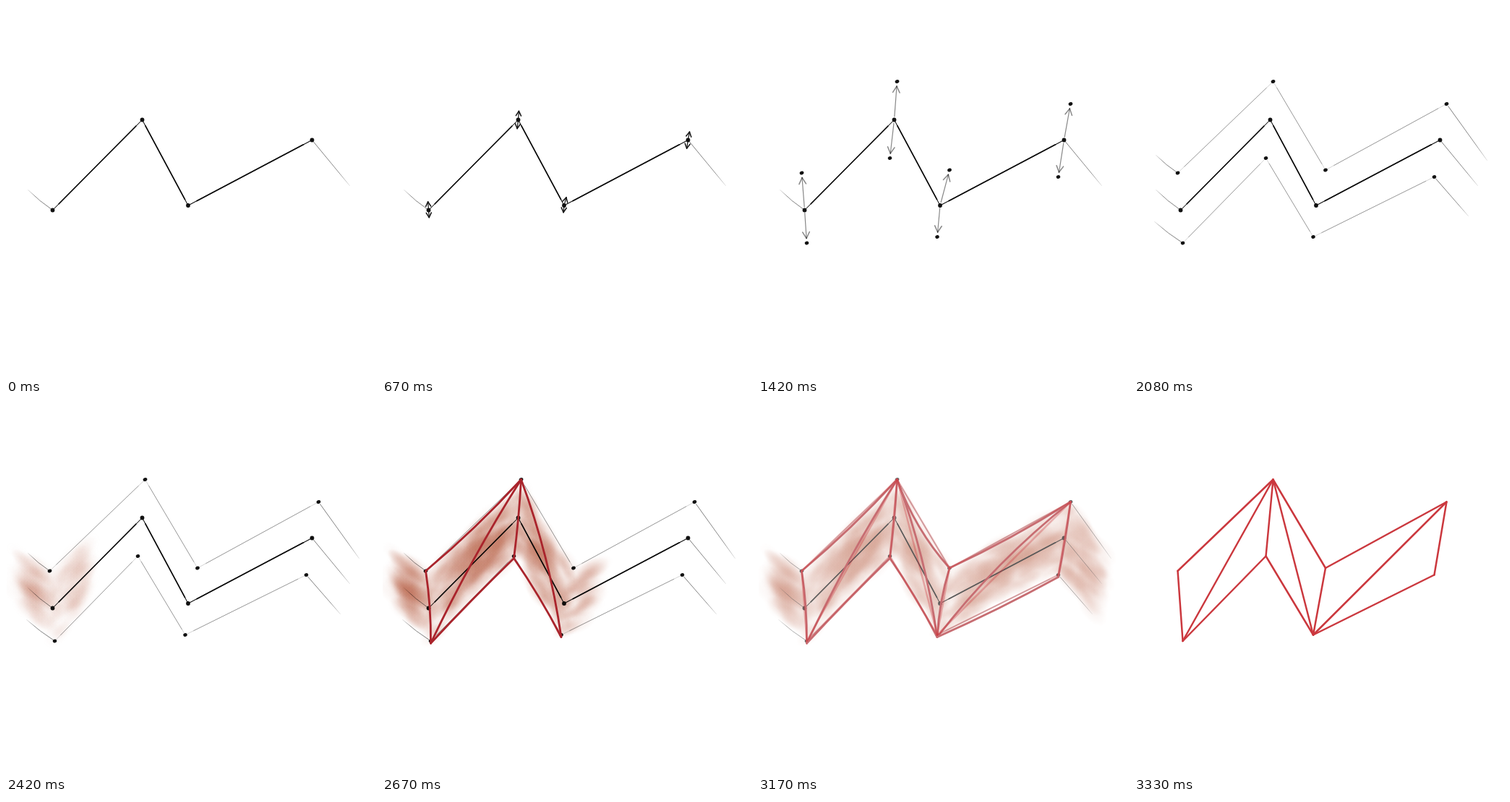
These frames come from a looping animation (512x512 px, 4.08 s). An HTML page with a canvas:

```html
<!DOCTYPE html>
<html lang="en">
<head>
<meta charset="utf-8">
<title>From line to triangles</title>
<style>
html, body { margin: 0; width: 100%; height: 100%; overflow: hidden; background: #fff; }
canvas { display: block; width: 100vw; height: 100vh; object-fit: contain; }
</style>
</head>
<body>
<canvas id="stage" width="512" height="512"></canvas>
<script>
const SIZE = 512, LOOP = 4080, FPS = 12;
// Ticks at which each phase begins
const GROW = 8, FADE = 17, OUTLINE = 25, PAINT = 29, CLEAN = 38;
const PAINT_STEPS = 6, TAU = Math.PI * 2;

const ctx = document.getElementById('stage').getContext('2d');

// Three parallel rails; the first and last points are loose tails
const top_ = [[30, 206], [60, 230.5], [192, 104], [264.5, 226.5], [432, 135], [488, 213]];
const mid = [[30, 254], [64, 282], [188, 157], [251.5, 275.5], [423, 185], [475, 248]];
const low = [[28, 298], [67, 327.5], [182, 210], [247.5, 319], [415, 236], [462, 290]];
const joints = [1, 2, 3, 4];

const corners = {
  a: top_[1], c: top_[2], e: top_[3], g: top_[4],
  b: low[1], d: low[2], f: low[3], h: low[4]
};
// New edges of each triangle, with the sideways bow of the loose stroke
const triangles = [
  { ab: 2, ac: -3, bc: 4 }, { bd: 1, cd: 1 }, { df: 2, cf: 6 },
  { ce: -7, ef: -3 }, { eg: -3, fg: 8 }, { gh: 1, hf: 2 }
];

function makeRandom(seed) {
  return () => (seed = (seed * 16807) % 2147483647) / 2147483647;
}

const clamp = x => Math.max(0, Math.min(1, x));
const mix = (p, q, k) => [p[0] + (q[0] - p[0]) * k, p[1] + (q[1] - p[1]) * k];
const distance = (p, q) => Math.hypot(q[0] - p[0], q[1] - p[1]);
const heading = (p, q) => Math.atan2(q[1] - p[1], q[0] - p[0]);
const polar = (p, angle, r) => [p[0] + Math.cos(angle) * r, p[1] + Math.sin(angle) * r];

// Stroke from p to q, bowed sideways in the middle
function line(p, q, color, width, bow = 0) {
  const control = polar(mix(p, q, 0.5), heading(p, q) - Math.PI / 2, bow * 2);
  ctx.strokeStyle = color;
  ctx.lineWidth = width;
  ctx.lineCap = 'round';
  ctx.beginPath();
  ctx.moveTo(...p);
  ctx.quadraticCurveTo(...control, ...q);
  ctx.stroke();
}

function dot([x, y], rx, ry, tilt) {
  ctx.fillStyle = '#111';
  ctx.beginPath();
  ctx.ellipse(x, y, rx, ry, tilt, 0, TAU);
  ctx.fill();
}

// Line whose far end dissolves
function tail(from, to, bow) {
  const shade = ctx.createLinearGradient(...from, ...to);
  shade.addColorStop(0, 'rgba(30,30,30,.6)');
  shade.addColorStop(0.7, 'rgba(30,30,30,.5)');
  shade.addColorStop(1, 'rgba(30,30,30,.12)');
  line(from, to, shade, 1, bow);
}

function drawRail(rail, color, width) {
  tail(rail[1], rail[0], 1);
  tail(mix(rail[4], rail[5], 0.04), rail[5], 0);
  for (const i of [1, 2, 3]) {
    const p = rail[i], q = rail[i + 1];
    line(p, q, color, width * 0.6);
    line(mix(p, q, 0.07), mix(p, q, 0.93), color, width);
  }
}

function drawEndDots() {
  for (const i of joints) {
    dot(top_[i], 2.9, 2.4, -0.4);
    dot(low[i], 2.8, 2.3, -0.3);
  }
}

function drawArrow(base, goal, grown) {
  const angle = heading(base, goal);
  const tip = polar(base, angle, (distance(base, goal) - 6.5) * grown);
  const barb = 6.5 + 3.5 * grown;
  line(mix(base, tip, 0.1), tip, '#111', 1.2);
  for (const side of [-1, 1]) line(tip, polar(tip, angle + Math.PI + side * 0.5, barb), '#111', 1.5);
}

function drawArrows(tick) {
  const grown = clamp(0.26 + 0.74 * (tick - GROW) / 6);
  ctx.save();
  if (tick >= FADE) ctx.globalAlpha *= 0.5 * clamp(1 - (tick - FADE) / 4);
  for (const i of joints) {
    drawArrow(mid[i], top_[i], grown);
    drawArrow(mid[i], low[i], grown);
  }
  ctx.restore();
}

// Soft brush dab, stretched along the stroke
function dab(g, [x, y], angle, length, height, alpha) {
  const tint = g.createRadialGradient(0, 0, 0, 0, 0, 1);
  tint.addColorStop(0, `rgba(184,98,72,${alpha})`);
  tint.addColorStop(0.5, `rgba(184,98,72,${alpha * 0.6})`);
  tint.addColorStop(1, 'rgba(184,98,72,0)');
  g.save();
  g.translate(x, y);
  g.rotate(angle);
  g.scale(length, height);
  g.fillStyle = tint;
  g.fillRect(-1, -1, 2, 2);
  g.restore();
}

// Watercolour between the outer rails, spreading from left to right
function makeWash(step) {
  const layer = document.createElement('canvas');
  layer.width = layer.height = SIZE;
  const g = layer.getContext('2d');
  const random = makeRandom(4711);
  const reach = 1.4 + step * 0.6, strength = Math.min(1, 0.45 + step * 0.25);
  for (let i = 0; i < 5; i++) {
    const angle = heading(mid[i], mid[i + 1]);
    const across = heading(top_[i], low[i]) - angle;
    const area = distance(mid[i], mid[i + 1]) * distance(top_[i], low[i]) * Math.abs(Math.sin(across));
    const begin = i === 0 ? -0.4 : 0;
    for (let n = 0; n < area * (1 - begin) / 40; n++) {
      const loose = [random(), random()], centred = loose.map(k => (k + random()) / 2);
      const [s, v] = n % 2 ? loose : centred;
      const u = begin + s * (1 - begin);
      const size = 0.5 + random() * 0.7, alpha = 0.04 + random() * 0.09;
      if (i + u > reach) continue;
      const at = mix(mix(top_[i], top_[i + 1], u), mix(low[i], low[i + 1], u), 0.04 + v * 0.92);
      dab(g, at, angle, 25 * size, 13 * size, alpha * strength);
    }
  }
  return layer;
}

const washes = Array.from({ length: PAINT_STEPS + 1 }, (_, step) => makeWash(step));

function drawWash(step) {
  ctx.save();
  ctx.globalCompositeOperation = 'multiply';
  ctx.drawImage(washes[step], 0, 0);
  ctx.restore();
}

// Loose strokes bow and overshoot the lower corners
function drawTriangles(count, loose) {
  const corner = name => {
    const [x, y] = corners[name];
    return [x, y + (loose && 'bdfh'.includes(name) ? 3 : 0)];
  };
  for (const edges of triangles.slice(0, count)) {
    for (const [[from, to], bow] of Object.entries(edges)) {
      if (loose) line(corner(from), corner(to), '#aa242c', 2.8, bow);
      else line(corner(from), corner(to), '#cb383e', 2.5);
    }
  }
}

function drawSketch(tick) {
  if (tick >= OUTLINE) {
    drawRail(top_, 'rgba(20,20,20,.3)', 1);
    drawRail(low, 'rgba(20,20,20,.3)', 1);
  }
  drawRail(mid, '#0c0c0c', 1.7);
  for (const i of joints) dot(mid[i], 2.9, 2.9, 0);
  if (tick >= GROW && tick < FADE + 4) drawArrows(tick);
  if (tick >= GROW + 6) drawEndDots();
  if (tick >= PAINT) {
    const step = Math.min(PAINT_STEPS, tick - PAINT);
    drawWash(step);
    drawTriangles(step, true);
  }
}

function clear(alpha) {
  ctx.globalAlpha = alpha;
  ctx.fillStyle = '#fff';
  ctx.fillRect(-1, -1, SIZE + 2, SIZE + 2);
}

function draw(tick) {
  ctx.setTransform(1, 0, 0, 1, 0.5, 0.5);
  clear(1);
  drawSketch(tick);
  const clean = clamp((tick - CLEAN + 1) / 3);
  if (clean > 0) {
    clear(clean);
    drawTriangles(PAINT_STEPS, false);
  }
}

const start = performance.now();
let shown = -1;

function frame() {
  const time = (performance.now() - start) % LOOP;
  const tick = Math.floor(time * FPS / 1000 + 0.05);
  if (tick !== shown) draw(shown = tick);
  requestAnimationFrame(frame);
}
frame();
</script>
</body>
</html>
```
